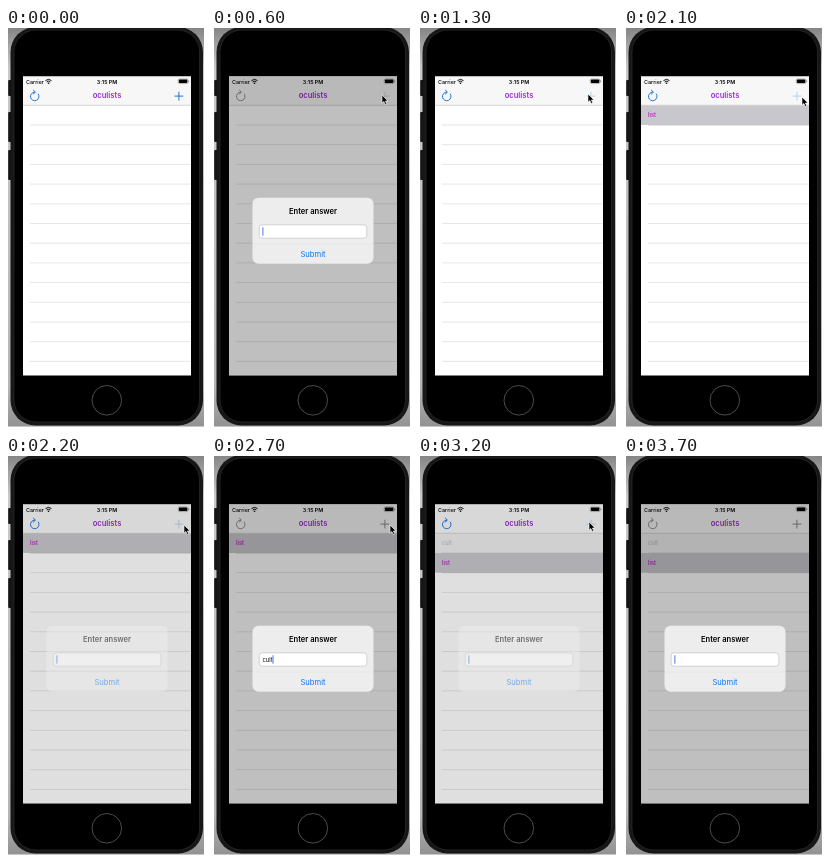
An HTML page that plays this animation: 200x400 px, repeating every 3800 ms.

```html
<!DOCTYPE html>
<html lang="en">
<head>
<meta charset="utf-8">
<title>Word list</title>
<style>
html, body { margin: 0; width: 100%; height: 100%; overflow: hidden; background: #fff; }
svg { display: block; width: 100vw; height: 100vh; }
text { font-family: Inter, Roboto, sans-serif; }
.status { font-size: 5.4px; font-weight: 500; }
.head { font-size: 7.6px; font-weight: 600; text-anchor: middle; }
.word { font-size: 5.5px; font-weight: 600; }
.icon { fill: none; stroke-width: .95; stroke-linecap: round; }
</style>
</head>
<body>
<svg viewBox="0 0 200 400" preserveAspectRatio="none">
  <defs>
    <linearGradient id="shade" x2="0" y2="1">
      <stop offset="0" stop-color="#858585"/>
      <stop offset=".1" stop-color="#c9c9c9"/>
      <stop offset=".9" stop-color="#b5b5b5"/>
      <stop offset="1" stop-color="#929292"/>
    </linearGradient>
    <clipPath id="glass"><rect x="17" y="48.5" width="168" height="299"/></clipPath>
  </defs>

  <!-- phone body -->
  <rect x="2" width="196" height="398.5" fill="url(#shade)"/>
  <g fill="#151515">
    <rect x="2.2" y="52" width="4" height="16" rx="1"/>
    <rect x="2.2" y="84" width="4" height="30" rx="1"/>
    <rect x="2.2" y="122" width="4" height="30" rx="1"/>
  </g>
  <rect x="4.5" y="-1" width="192.5" height="398.5" rx="25" fill="#171717"/>
  <rect x="8" y="2" width="185.5" height="392" rx="22" stroke="#2c2c2c" stroke-width=".7"/>
  <circle cx="100.8" cy="372.3" r="14.8" fill="#000" stroke="#555" stroke-width=".9"/>

  <g clip-path="url(#glass)">
    <rect x="17" y="48" width="168" height="300" fill="#fff"/>
    <g id="lines" stroke="#d6d6d6" stroke-width=".6"></g>
    <g id="rows"></g>
    <rect x="17" y="48" width="168" height="29.3" fill="#f7f7f7"/>
    <path d="M17 77.3H185" stroke="#bdbdbd" stroke-width=".6"/>

    <text class="status" x="20" y="55.5">Carrier</text>
    <g fill="none" stroke="#000" stroke-width=".95">
      <path d="M39.5 52.6q3-2.6 6 0M40.7 54q1.8-1.6 3.6 0"/>
    </g>
    <circle cx="42.5" cy="55.2" r=".8"/>
    <text class="status" x="101" y="55.5" text-anchor="middle" style="font-weight:600">3:15 PM</text>
    <rect x="172.2" y="51" width="9.8" height="4.6" rx="1.2" fill="none" stroke="#777" stroke-width=".5"/>
    <rect x="172.9" y="51.6" width="8.4" height="3.4" rx=".7"/>
    <path d="M182.7 52.5v1.6" stroke="#777" stroke-width=".7"/>

    <g id="refresh" class="icon">
      <path d="M32.4 66.1A4.3 4.3 0 1 1 28.6 64.1"/>
      <path d="M27.4 62.2L29.4 64.1L27.4 66"/>
    </g>
    <path id="plus" class="icon" d="M168.9 68.1h8M172.9 64.1v8"/>
    <text class="head" x="101" y="70.4" fill="#9630cb">oculists</text>
    <rect id="dim" x="17" y="48" width="168" height="300"/>

    <g id="dialog">
      <rect x="40.5" y="169.8" width="121" height="66" rx="6" fill="#ededed"/>
      <text class="head" x="101" y="185.9">Enter answer</text>
      <rect x="47.2" y="196.9" width="107.6" height="13.3" rx="2.8" fill="#fff" stroke="#b9b9b9" stroke-width=".6"/>
      <text id="entry" x="50.5" y="205.7" font-size="5.8"></text>
      <path id="caret" stroke="#3568e8" stroke-width=".9"/>
      <path d="M40.5 216.1h121" stroke="#dfdfdf" stroke-width=".4"/>
      <text class="head" x="101" y="228.7" fill="#0a74f0" style="font-weight:400">Submit</text>
    </g>
  </g>
  <path id="cursor" d="M0 0V8.2L1.9 6.5L3.2 9.5L4.7 8.8L3.4 6H6Z" stroke="#fff" stroke-width=".6"/>
</svg>

<script>
const LOOP = 3800, STEP = 100, ROW = 19.7, TOP = 77.3;
const $ = id => document.getElementById(id);

// Dialog visits: start of fade-in, dismissal, typed word, first key
const visits = [
  { from: 400, to: 1300, word: "", key: 0 },
  { from: 1400, to: 2000, word: "list", key: 1600 },
  { from: 2200, to: 3000, word: "cult", key: 2400 },
  { from: 3200, to: LOOP, word: "", key: 0 }
];
const presses = [[300, 700], [1300, 1500], [2100, 2300], [3100, 3300]];
// Pointer stops: time, x, y
const stops = [
  [100, 177, 84], [300, 170, 67], [1200, 170, 67], [1300, 170, 66],
  [1900, 170, 66], [2100, 178, 69], [2800, 178, 69], [3000, 171, 66], [3500, 171, 66]
];

for (let i = 1; i < 14; i++) {
  const y = (TOP + i * ROW).toFixed(1);
  $("lines").innerHTML += `<path d="M24 ${y}H185"/>`;
}

const rowMarkup = (i, word, back, ink) => {
  const y = TOP + i * ROW;
  return `<rect x="17" y="${y}" width="168" height="${ROW}" fill="${back}"/>
    <path d="M24 ${y + ROW}H185" stroke="#bbb" stroke-width=".5"/>
    <text class="word" x="24" y="${y + 11.8}" fill="${ink}">${word}</text>`;
};

function drawRows(t) {
  let out = "";
  if (t >= 3000) out += rowMarkup(0, "cult", "#eeeeee", t < 3200 ? "#f0b5ce" : "#cbc0cb");
  if (t >= 2000) out += rowMarkup(t < 3000 ? 0 : 1, "list", "#c8c7cd", "#bd2cc4");
  $("rows").innerHTML = out;
}

function drawDialog(t) {
  const v = visits.find(v => t >= v.from && t < v.to);
  const shown = v ? (t < v.from + STEP ? .5 : 1) : 0;
  $("dim").setAttribute("opacity", .25 * shown);
  $("dialog").setAttribute("opacity", shown);
  if (v) {
    const typed = t < v.key ? "" : v.word.slice(0, (t - v.key) / STEP + 1);
    $("entry").textContent = typed;
    const x = 50.9 + (typed ? $("entry").getComputedTextLength() : 0);
    $("caret").setAttribute("d", `M${x} 199.3v8.4`);
    const blinkOn = typed || (t - v.from) % 500 < 300;
    $("caret").setAttribute("opacity", blinkOn ? 1 : 0);
  }
  const pressed = presses.some(([a, b]) => t >= a && t < b);
  const full = shown === 1;
  $("refresh").setAttribute("stroke", full ? "#8b8b8b" : "#1670df");
  $("plus").setAttribute("stroke", pressed ? (full ? "#d0d0d0" : "#bdd0ec") : (full ? "#858585" : "#1670df"));
}

function drawCursor(t) {
  const next = stops.findIndex(s => s[0] > t);
  const visible = next > 0;
  $("cursor").setAttribute("opacity", visible ? 1 : 0);
  if (!visible) return;
  const [a, b] = [stops[next - 1], stops[next]];
  const k = (t - a[0]) / (b[0] - a[0]);
  const at = i => a[i] + (b[i] - a[i]) * k;
  $("cursor").setAttribute("transform", `translate(${at(1)} ${at(2)})`);
}

function render(ms) {
  const t = Math.floor((ms % LOOP) / STEP) * STEP;
  drawRows(t);
  drawDialog(t);
  drawCursor(t);
}

const start = performance.now();
function tick() {
  render(performance.now() - start);
  requestAnimationFrame(tick);
}
tick();
</script>
</body>
</html>
```
